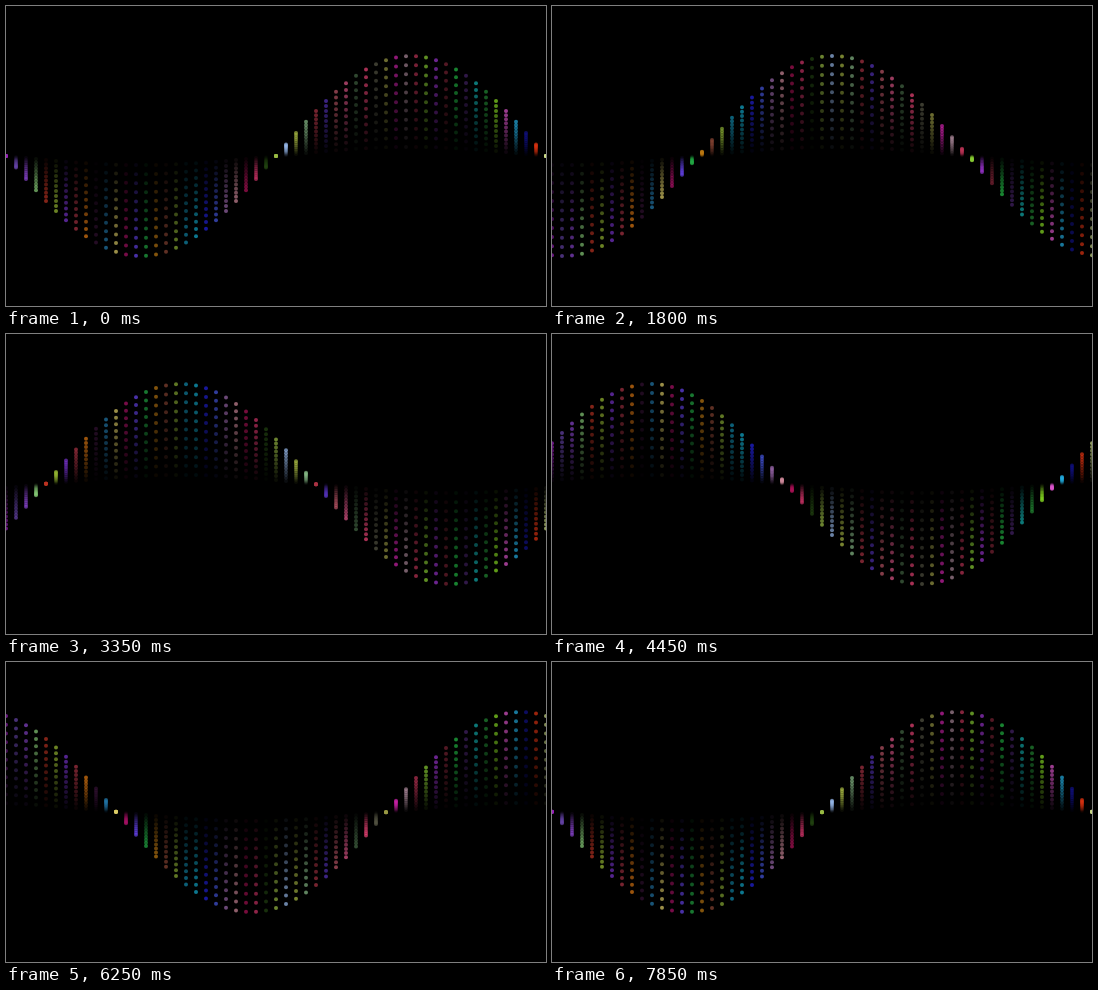
Recreate the animation shown at these times as an HTML page with a canvas. Size 540x300 px, loop 7.9 s.

```html
<!DOCTYPE html>
<html lang="en">
<head>
<meta charset="utf-8">
<title>Dot wave</title>
<style>
  html, body { margin: 0; width: 100%; height: 100%; overflow: hidden; background: #000; }
  canvas { display: block; }
</style>
</head>
<body>
<canvas id="stage" width="540" height="300"></canvas>
<script>
const ctx = document.getElementById('stage').getContext('2d');
const STEP_MS = 50, STEPS = 158, TURN = 0.04;
const GAP = 10, MID = 150, HEIGHT = 100, DOTS = 11, RADIUS = 2;

// One colour per column, left to right
const colors = (
  '#92b #64a #84c #8c7 #b32 #9b3 #73c #a34 #d71 #313 #27a ' +
  '#dc6 #a16 #64e #2a4 #b71 #843 #8a3 #18a #1ac #22d #45d ' +
  '#96a #c89 #a15 #c36 #241 #9b4 #9be #ab4 #8b8 #a34 #53b ' +
  '#b56 #d58 #464 #e47 #554 #994 #c2a #a89 #b35 #8c3 #93c ' +
  '#723 #2b4 #426 #1aa #283 #8d2 #d5c #2ad #118 #d31 #cd8'
).split(' ');

function drawColumn(color, i, phase) {
  const x = i * GAP;
  const reach = HEIGHT * Math.sin(x / 540 * 2 * Math.PI + phase);
  ctx.fillStyle = color;
  for (let k = 1; k <= DOTS; k++) {
    const part = k / DOTS;
    ctx.globalAlpha = 0.7 * part;
    ctx.beginPath();
    ctx.arc(x, MID + reach * part, RADIUS, 0, 2 * Math.PI);
    ctx.fill();
  }
}

function draw(now) {
  const step = Math.floor(now / STEP_MS + 0.001) % STEPS;
  ctx.clearRect(0, 0, 540, 300);
  colors.forEach((color, i) => drawColumn(color, i, step * TURN));
  requestAnimationFrame(draw);
}

draw(0);
</script>
</body>
</html>
```
